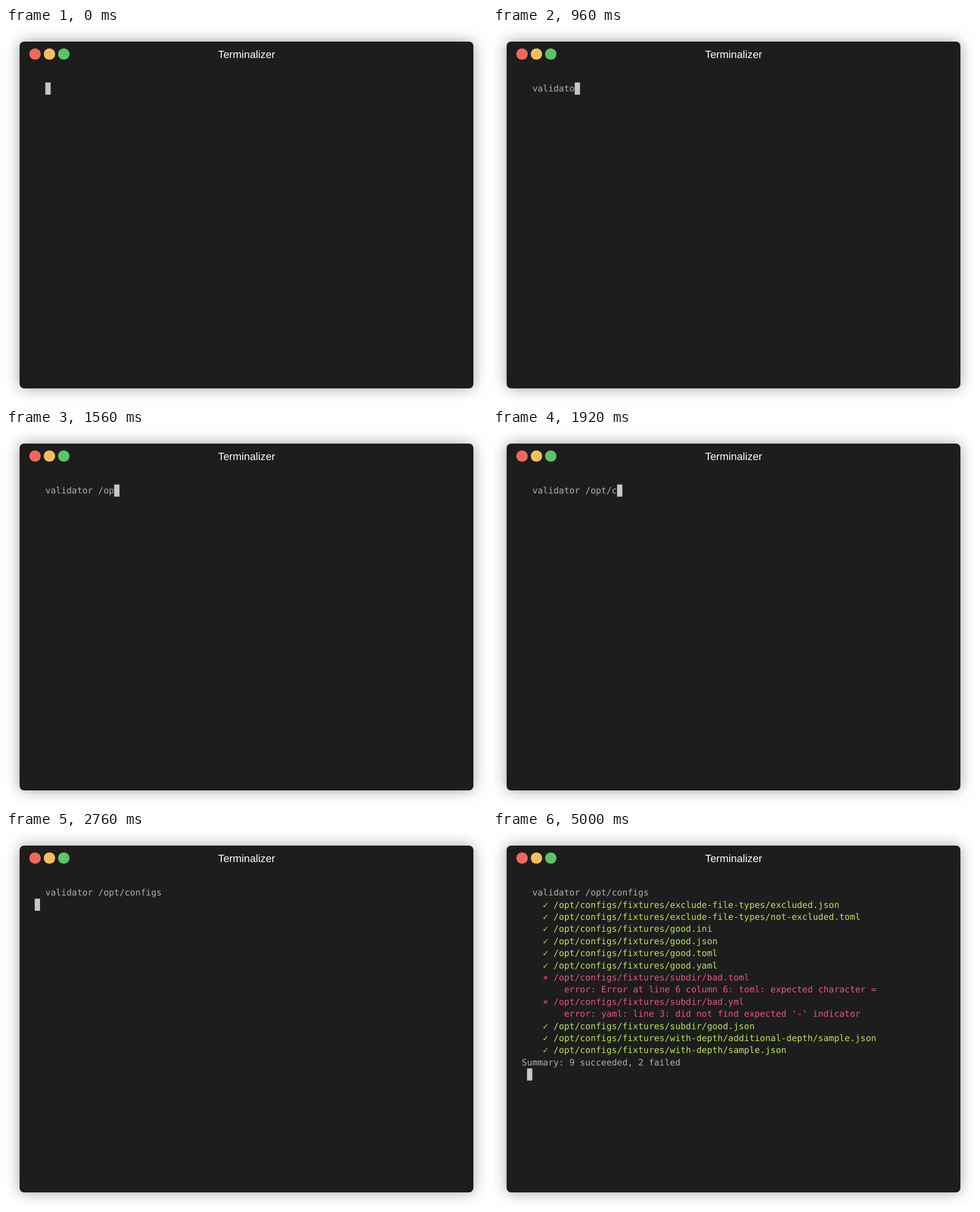
Recreate the animation shown at these times as an HTML page. Size 849 px wide and 660 px high, loop 5120 ms.

```html
<!DOCTYPE html>
<html lang="en">
<head>
<meta charset="utf-8">
<title>Terminal</title>
<style>
  html, body { margin: 0; width: 100%; height: 100%; overflow: hidden; background: #fff; }
  #window {
    position: absolute; left: 24px; top: 24px; width: 801px; height: 612px;
    border-radius: 8px; background: #1d1d1d; box-shadow: 0 0 26px rgba(0, 0, 0, .36);
  }
  svg { position: absolute; left: 0; top: 0; display: block; }
  text {
    font: 15.53px "DejaVu Sans Mono", monospace;
    text-rendering: geometricPrecision; white-space: pre; fill: #afafaf;
  }
  .title { font: 18.7px "Liberation Sans", Arial, sans-serif; fill: #fff; text-anchor: middle; }
  .good { fill: #bde25b; }
  .bad { fill: #e85384; }
  #cursor { fill: #c7c7c7; }
</style>
</head>
<body>
<div id="window"></div>
<svg width="849" height="660" viewBox="0 0 849 660">
  <circle cx="51.3" cy="46" r="10.1" fill="#ee6860"/>
  <circle cx="76.7" cy="46" r="10.1" fill="#f5be5d"/>
  <circle cx="102" cy="46" r="10.1" fill="#5dc466"/>
  <text class="title" x="424.7" y="52.8">Terminalizer</text>
  <g id="output"></g>
  <text id="command"></text>
  <rect id="cursor"/>
</svg>
<script>
const LOOP = 5120, KEY_TIME = 120, ENTER = 2760, REPORT = 3000, PROMPT = 5000;
const CELL = { x: 50.7, y: 96.2, w: 9.35, h: 21.4 };
const BASELINE = 16;
const COMMAND = "validator /opt/configs";
const ROOT = "/opt/configs/fixtures/";

const REPORT_LINES = [
  ["good", "exclude-file-types/excluded.json"],
  ["good", "exclude-file-types/not-excluded.toml"],
  ["good", "good.ini"],
  ["good", "good.json"],
  ["good", "good.toml"],
  ["good", "good.yaml"],
  ["bad", "subdir/bad.toml"],
  ["error", "error: Error at line 6 column 6: toml: expected character ="],
  ["bad", "subdir/bad.yml"],
  ["error", "error: yaml: line 3: did not find expected '-' indicator"],
  ["good", "subdir/good.json"],
  ["good", "with-depth/additional-depth/sample.json"],
  ["good", "with-depth/sample.json"],
  ["summary", "Summary: 9 succeeded, 2 failed"]
];

const output = document.getElementById("output");
const command = document.getElementById("command");
const cursor = document.getElementById("cursor");

const colX = col => CELL.x + col * CELL.w;
const rowY = row => CELL.y + row * CELL.h;

function place(element, col, row, dy = 0) {
  element.setAttribute("x", colX(col));
  element.setAttribute("y", rowY(row) + dy);
}

function print(col, row, content, style) {
  const line = document.createElementNS(output.namespaceURI, "text");
  line.textContent = content;
  line.setAttribute("class", style);
  place(line, col, row, BASELINE);
  output.append(line);
}

REPORT_LINES.forEach(([kind, content], i) => {
  const row = i + 1;
  if (kind === "summary") print(0, row, content, "");
  else if (kind === "error") print(8, row, content, "bad");
  else {
    print(4, row, kind === "good" ? "✓" : "×", kind);
    print(6, row, ROOT + content, kind);
  }
});

place(command, 2, 0, BASELINE);
cursor.setAttribute("width", CELL.w);
cursor.setAttribute("height", CELL.h);

function render(t) {
  const typed = Math.min(COMMAND.length, Math.floor(t / KEY_TIME));
  const text = COMMAND.slice(0, typed);
  if (command.textContent !== text) command.textContent = text;
  output.setAttribute("visibility", t >= REPORT ? "visible" : "hidden");

  if (t < ENTER) place(cursor, 2 + typed, 0);
  else if (t < REPORT) place(cursor, 0, 1);
  else place(cursor, t < PROMPT ? 0 : 1, REPORT_LINES.length + 1);
}

let start;
function tick(now) {
  start ??= now;
  render((now - start) % LOOP);
  requestAnimationFrame(tick);
}
render(0);
requestAnimationFrame(tick);
</script>
</body>
</html>
```
